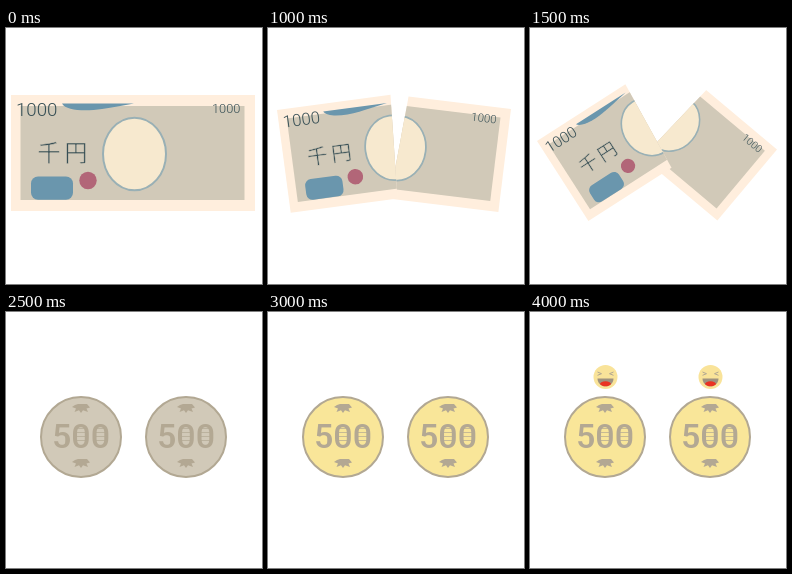
Animation of 256x256 px, one loop 4500 ms. Source, as an HTML page:

```html
<!DOCTYPE html>
<html lang="ja">
<head>
<meta charset="utf-8">
<style>
  html, body { margin: 0; width: 100%; height: 100%; overflow: hidden; background: #fff; }
  svg { display: block; width: 100%; height: 100%; }
  .print { font-family: Roboto, sans-serif; font-weight: 300; fill: #374f55; }
  .kanji { font-family: "Noto Sans CJK JP", "Noto Sans CJK", sans-serif; letter-spacing: 4px; stroke: #d1c9b8; stroke-width: .6px; }
  .value { font: 500 34px Roboto, sans-serif; text-anchor: middle; }
</style>
</head>
<body>
<svg viewBox="0 0 256 256">
  <defs>
    <clipPath id="leftCut"><path d="M0 60H133.5L125 190H0Z"/></clipPath>
    <clipPath id="rightCut"><path d="M134 60H256V190H126Z"/></clipPath>
    <clipPath id="mouthShape"><path id="mouth" d="M67.5 66.5H83.5C83.5 71 80 74.3 75.5 74.3S67.5 71 67.5 66.5Z"/></clipPath>

    <g id="note">
      <path fill="#ffeedd" d="M5 67H249V183H5Z"/>
      <path fill="#d1c9b8" d="M14.5 78H238.5V172H14.5Z"/>
      <path fill="#6a96ad" d="M56 75.5H128Q108 79 96 81C80 83.5 60 83 56 75.5Z"/>
      <ellipse cx="128.5" cy="126" rx="31.5" ry="36.3" fill="#f7e9cf" stroke="#99b0b5" stroke-width="2"/>
      <rect x="25" y="148.5" width="42" height="23.3" rx="7" fill="#6a96ad"/>
      <circle cx="82" cy="152.5" r="8.7" fill="#b26678"/>
      <text class="print" x="10" y="87.7" font-size="18.7">1000</text>
      <text class="print" x="206" y="85.3" font-size="12.8">1000</text>
      <text class="print kanji" x="31.5" y="132.5" font-size="23">千円</text>
    </g>

    <path id="leaf" d="M-9 -1L-6 -3L-3 -4H6L9 -.5L5.5 .5L7 4L2 2.3L0 5L-2 2.3L-6.5 4L-5 .5Z"/>
    <g id="coin">
      <circle cx="75" cy="125" r="40" stroke="#b2a893" stroke-width="2"/>
      <g fill="#b3a893">
        <use href="#leaf" x="75" y="96"/>
        <use href="#leaf" x="75" y="151"/>
        <text class="value" x="75" y="136">500</text>
      </g>
      <path fill="none" stroke="#b3a893" stroke-opacity=".7" d="M59.5 121V134M70 116.5H81M70 120.5H81M70 124.5H81M70 128.5H81M88.5 116.5H99.5M88.5 120.5H99.5M88.5 124.5H99.5M88.5 128.5H99.5"/>
    </g>

    <g id="face">
      <circle cx="75.5" cy="65" r="12" fill="#f9e399"/>
      <path fill="none" stroke="#b2a893" d="M67.5 60L71.5 61.7L67.5 63.3M83.5 60L79.5 61.7L83.5 63.3"/>
      <use href="#mouth" fill="#9f927f"/>
      <ellipse cx="75.5" cy="73" rx="5.8" ry="3.8" fill="#ea3323" clip-path="url(#mouthShape)"/>
    </g>
  </defs>

  <use id="whole" href="#note"/>
  <g id="halves">
    <g id="right"><use href="#note" clip-path="url(#rightCut)"/></g>
    <g id="left"><use href="#note" clip-path="url(#leftCut)"/></g>
  </g>
  <g id="coins"><use href="#coin"/><use href="#coin" x="105"/></g>
  <g id="faces">
    <g transform="translate(75.5 0)"><g class="pop"><use href="#face" x="-75.5"/></g></g>
    <g transform="translate(180.5 0)"><g class="pop"><use href="#face" x="-75.5"/></g></g>
  </g>
</svg>
<script>
const STEP = 500, STEPS = 9;
const part = id => document.getElementById(id);
const show = (id, visible) => part(id).setAttribute('display', visible ? 'inline' : 'none');
const pops = document.querySelectorAll('.pop');

// Each pose gives the outer top corner's x and y, the angle and the scale.
const tears = [
  { left: [3, 69, -1, .985], right: [249, 69, 1, .985] },
  { left: [9, 82, -7.6, .894], right: [243, 81, 7, .894] },
  { left: [7, 113, -32.7, .82], right: [247, 121.5, 40, .8] },
  { left: [17, 152.5, -65, .76], right: [235, 149, 65, .76] }
];

function place(id, [x, y, angle, scale], cornerX) {
  part(id).setAttribute('transform',
    `translate(${x} ${y}) rotate(${angle}) scale(${scale}) translate(${-cornerX} -67)`);
}

function draw(now) {
  const step = Math.floor(now / STEP) % STEPS;
  const tear = tears[step - 1];
  show('whole', step === 0);
  show('halves', tear);
  show('coins', step >= 5);
  show('faces', step >= 7);
  if (tear) {
    place('left', tear.left, 5);
    place('right', tear.right, 249);
  }
  part('coins').setAttribute('fill', step === 5 ? '#d1c9b8' : '#f9e699');
  const growth = step === 7 ? 'translate(0 73) scale(.67) translate(0 -65)' : '';
  pops.forEach(pop => pop.setAttribute('transform', growth));
  requestAnimationFrame(draw);
}
requestAnimationFrame(draw);
</script>
</body>
</html>
```
